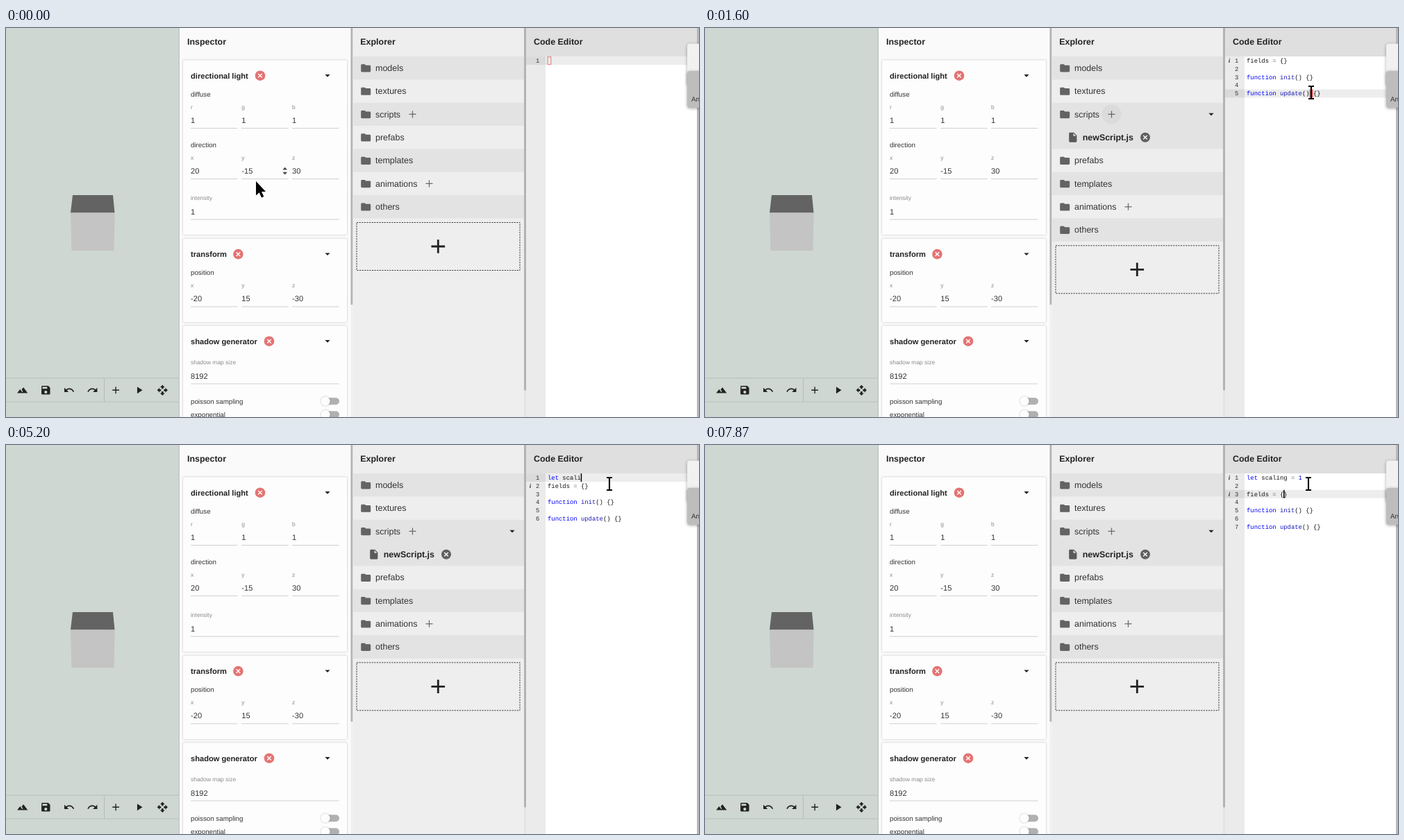
Animation, 998 px wide and 561 px high, one loop 8 s. Source, as an HTML page:

```html
<!DOCTYPE html>
<html lang="en">
<head>
<meta charset="utf-8">
<title>Scene editor</title>
<style>
  html, body { margin: 0; width: 100%; height: 100%; overflow: hidden; background: #ced7d1; }
  svg { display: block; width: 998px; height: 561px; font-family: "Liberation Sans", Arial, sans-serif; text-rendering: geometricPrecision; }
  .bold { font-weight: bold; }
  .code { font: 8.887px "Liberation Mono", monospace; white-space: pre; }
  .kw { fill: #0000ff; } .fn { fill: #1a1ab8; } .num { fill: #0000cd; } .op { fill: #687687; }
  .card { fill: #fdfdfd; filter: drop-shadow(0 .8px 1.2px rgba(0, 0, 0, .28)); }
  .float { filter: drop-shadow(0 1px 2px rgba(0, 0, 0, .35)); }
</style>
</head>
<body>
<svg viewBox="0 0 998 561">
  <g id="base"></g><g id="explorer"></g><g id="editor"></g><g id="overlay"></g><g id="mouse"></g>
</svg>
<script>
const LOOP = 8000, CHAR = 5.333, LINE = 11.85, TOP = 41.1, CODE_X = 780, ROW = 33.35;

// 24-unit icons
const ICON = {
  terrain: 'M14 6l-3.75 5 2.85 3.8-1.6 1.2C9.81 13.75 7 10 7 10l-6 8h22L14 6z',
  save: 'M17 3H5c-1.11 0-2 .9-2 2v14c0 1.1.89 2 2 2h14c1.1 0 2-.9 2-2V7l-4-4zm-5 16c-1.66 0-3-1.34-3-3s1.34-3 3-3 3 1.34 3 3-1.34 3-3 3zm3-10H5V5h10v4z',
  undo: 'M12.5 8c-2.65 0-5.05.99-6.9 2.6L2 7v9h9l-3.62-3.62c1.39-1.16 3.16-1.88 5.12-1.88 3.54 0 6.55 2.31 7.6 5.5l2.37-.78C21.08 11.03 17.15 8 12.5 8z',
  redo: 'M18.4 10.6C16.55 8.99 14.15 8 11.5 8c-4.65 0-8.58 3.03-9.96 7.22L3.9 16c1.05-3.19 4.05-5.5 7.6-5.5 1.95 0 3.73.72 5.12 1.88L13 16h9V7l-3.6 3.6z',
  add: 'M19 13h-6v6h-2v-6H5v-2h6V5h2v6h6v2z',
  play: 'M8 5v14l11-7z',
  move: 'M10 9h4V6h3l-5-5-5 5h3v3zm-1 1H6V7l-5 5 5 5v-3h3v-4zm14 2l-5-5v3h-3v4h3v3l5-5zm-9 3h-4v3H7l5 5 5-5h-3v-3z',
  folder: 'M10 4H4c-1.1 0-1.99.9-1.99 2L2 18c0 1.1.9 2 2 2h16c1.1 0 2-.9 2-2V8c0-1.1-.9-2-2-2h-8l-2-2z',
  file: 'M6 2c-1.1 0-1.99.9-1.99 2L4 20c0 1.1.89 2 1.99 2H18c1.1 0 2-.9 2-2V8l-6-6H6zm7 7V3.5L18.5 9H13z',
  drop: 'M7 10l5 5 5-5z'
};

const POINTER = {
  arrow: '<path d="M0 0V20.5L4.7 16.2 8 23.6 11.3 22.2 8 15H14Z"/>',
  hand: '<path d="M-2.3 2Q-2 0 0 0T2.3 2V6.2L4.5 6.4 9 8Q11 9 11 11V16Q11 18 9.3 19.5V23H-1V20.3L-6 14Q-7 11-4.5 11L-2.3 12.3Z"/>',
  text: '<path d="M-4-9h2.5Q0-9 0-7.5V7.5Q0 9-1.5 9H-4M4-9H1.5Q0-9 0-7.5V7.5Q0 9 1.5 9H4" fill="none" stroke="#000" stroke-width="2.1"/>'
};

const rect = (x, y, w, h, fill, more = '') => `<rect x="${x}" y="${y}" width="${w}" height="${h}" fill="${fill}" ${more}/>`;
const text = (x, y, s, size, fill = '#333', more = '') => `<text x="${x}" y="${y}" font-size="${size}" fill="${fill}" ${more}>${s}</text>`;
const bold = (x, y, s, size) => text(x, y, s, size, '#222', 'class="bold"');
const icon = (name, x, y, k = .7, fill = '#222') =>
  `<path d="${ICON[name]}" fill="${fill}" transform="translate(${x} ${y}) scale(${k}) translate(-12 -12)"/>`;
const thinPlus = (x, y) => `<path d="M${x - 5} ${y}h10m-5-5v10" stroke="#6a6a6a" stroke-width="1.25"/>`;
const close = (x, y, r, fill) => `<circle cx="${x}" cy="${y}" r="${r}" fill="${fill}"/>
  <path d="M${x - 2.8} ${y - 2.8}l5.6 5.6m0-5.6l-5.6 5.6" stroke="#fff" stroke-width="1.4"/>`;

function field(x, y, label, value, width = 67.5) {
  return text(x, y, label, 8.44, '#8a8a8a') + text(x, y + 20.5, value, 11.11) + rect(x, y + 27.6, width, 1, '#cfcfcf');
}
function vector(y, title, labels, values) {
  return text(266, y, title, 9.78) + values.map((v, i) => field([266, 339.3, 412][i], y + 17.5, labels[i], v)).join('');
}
function card(y, h, title, closeX) {
  return rect(255, y, 236, h, '#fdfdfd', 'rx="2" class="card"') + bold(266, y + 26.3, title, 11.14) +
    close(closeX, y + 22.4, 7.3, '#e57373') + icon('drop', 463, y + 22.2, .72);
}
function toggle(y, label) {
  return text(266, y + 3.8, label, 9.78) + rect(456, y - 5, 24, 10, '#b0b0b0', 'rx="5"') +
    `<circle cx="460" cy="${y}" r="6.6" fill="#fafafa" class="card"/>`;
}

function drawBase() {
  const tools = ['terrain', 'save', 'undo', 'redo', 'add', 'play', 'move'];
  return rect(0, 0, 250, 561, '#ced7d1') +
    '<path d="M96 241H154L156.5 266.5H93Z" fill="#636363"/><path d="M93 266.5H156.5L155.5 321.3H94.5Z" fill="#c4c4c4"/>' +
    rect(0, 504.5, 249, 1.2, '#b9c2bc') + rect(0, 538.5, 249, 1.2, '#bcc5bf') + rect(141, 506, 1, 33, '#b4bcb7') +
    tools.map((n, i) => icon(n, 23.7 + i * 33.6, 522.3, .69)).join('') +
    rect(248.6, 0, 1.4, 561, '#bfc6c1') + rect(250, 0, 250, 561, '#fafafa') + bold(261, 24.2, 'Inspector', 12.44) +
    card(46.3, 252, 'directional light', 366) +
    vector(99, 'diffuse', 'rgb', [1, 1, 1]) + vector(172, 'direction', 'xyz', [20, -15, 30]) +
    field(266, 248, 'intensity', 1, 213.5) +
    card(303.7, 120.5, 'transform', 334.4) + vector(356.3, 'position', 'xyz', [-20, 15, -30]) +
    card(429.3, 150, 'shadow generator', 379) + field(266, 485, 'shadow map size', 8192, 213.5) +
    toggle(538.2, 'poisson sampling') + toggle(557.5, 'exponential') +
    rect(496.5, 0, 3, 561, '#f0f0f0') + rect(496.5, 0, 3, 399, '#b3b3b3');
}

function drawExplorer(t) {
  const open = t >= 1070;
  const names = ['models', 'textures', 'scripts', 'prefabs', 'templates', 'animations', 'others'];
  let s = rect(499.5, 0, 247, 561, '#eee') + bold(510.3, 24.2, 'Explorer', 12.44);
  names.forEach((name, i) => {
    const y = 41 + ROW * (i + (open && i > 2)), mid = y + 16.7;
    if (i % 2 === 0) s += rect(499.5, y, 246.5, ROW, '#e3e3e3');
    s += icon('folder', 518.2, mid + .2, .7, '#636363') + text(532, mid + 4.3, name, 12.5);
    if (name === 'scripts') s += thinPlus(585.5, mid);
    if (name === 'animations') s += thinPlus(609.5, mid);
  });
  if (open) {
    const y = 41 + ROW * 3, mid = y + 16.7;
    s += rect(499.5, y, 246.5, ROW, '#e3e3e3') + icon('file', 529.8, mid, .7, '#5a5a5a') +
      bold(543.7, mid + 4.3, 'newScript.js', 12.44) + close(634, mid, 7, '#606060') + icon('drop', 729, 124.3, .72);
  }
  const hover = Math.max(0, Math.min((t - 1000) / 130, (1800 - t) / 300, 1));
  if (hover > 0) s += `<circle cx="585.5" cy="124.4" r="14" opacity="${hover * .045}"/>`;
  const boxY = open ? 313.8 : 280.5;
  s += rect(505, boxY, 235, 69, 'none', 'stroke="#333" stroke-dasharray="2.2 1.4" stroke-width=".95"') +
    icon('add', 622.3, boxY + 34.5, 1.4);
  return s + rect(746, 0, 3, 561, '#e4e4e4') + rect(746, 0, 3, 522.5, '#b3b3b3');
}

const FILE = ['fields = {}', '', 'function init() {}', '', 'function update() {}'];
const TYPED = 'let scaling = 1';
const KEYS = [3930, 4000, 4130, 4200, 4470, 4730, 4800, 4870, 5200, 5330, 5470, 5530, 5670, 5800, 5870];

// time, row, column, caret shape
const CARET = [
  [0, 0, 0, 'frame'], [1530, 4, 17, 'block'], [2270, 1, 0, 'block'], [3000, 1, 0, ''], [3330, 0, 0, 'block'],
  [3600, 0, 0, 'bar'], [6130, 1, 0, 'bar'], [6400, 1, 0, 'block'], [6670, 2, 0, 'block'], [6930, 2, 5, 'block'],
  [7200, 2, 7, 'block'], [7470, 2, 10, 'block'], [7870, 2, 10, 'bar']
];
// time, rows with an info mark, row with a warning
const MARKS = [[0, [], -1], [1530, [0], -1], [3600, [], -1], [4200, [1], -1], [5670, [], 1], [6130, [], 2], [6400, [0, 2], -1]];
const latest = (list, t) => list.filter(e => e[0] <= t).pop();

const paint = line => line.replace(/(function|let)|(init|update)|(\d)|(=)/g, (m, ...g) =>
  `<tspan class="${['kw', 'fn', 'num', 'op'][g.findIndex(Boolean)]}">${m}</tspan>`);

function drawEditor(t) {
  const count = KEYS.filter(k => k <= t).length;
  let lines = t < 1070 ? [''] : FILE;
  if (t >= 3600) lines = [TYPED.slice(0, count), ...(t >= 6130 ? [''] : []), ...FILE];
  let [, row, col, shape] = latest(CARET, t);
  if (t >= 3600 && t < 6130) col = count;
  const [, infos, warning] = latest(MARKS, t);
  const rowY = i => TOP + i * LINE, y = rowY(row), x = CODE_X + col * CHAR;

  let s = rect(749, 0, 249, 561, '#fff') + rect(749, 0, 247, 41, '#dfdfdf') + bold(760, 24.2, 'Code Editor', 12.44) +
    rect(749, 41, 28, 520, '#ebebeb') + rect(749, y, 28, LINE, '#dadada') + rect(777, y, 218, LINE, '#ededed');
  if (shape === 'block') s += rect(x - .4, y, CHAR + .3, LINE, '#e67878');
  if (shape === 'frame') s += rect(x, y + .6, CHAR - .5, LINE - 1, 'none', 'stroke="#e67878"');
  lines.forEach((line, i) => {
    const base = rowY(i) + 8.8;
    s += text(768.4, base, i + 1, 8.887, '#333', 'text-anchor="end" class="code"') +
      text(CODE_X, base, paint(line), 8.887, '#111', 'class="code"');
  });
  for (const i of infos)
    s += text(753.8, rowY(i) + 8.8, 'i', 9, '#333', 'font-family="Liberation Serif, serif" font-style="italic" font-weight="bold"');
  if (warning >= 0) {
    const w = rowY(warning) + 2;
    s += `<path d="M755 ${w}L759.3 ${w + 7.5}H750.7Z" fill="#f3c27c" stroke="#9a6a35" stroke-width=".9" stroke-linejoin="round"/>
      <path d="M755 ${w + 2.6}v2.4m0 .7v1" stroke="#4a3010" stroke-width="1"/>`;
  }
  if (shape === 'bar') s += rect(x - .3, y, 1.5, LINE, '#000');
  return s;
}

const drawOverlay = () => rect(995, 0, 3, 561, '#b9b9b9') +
  rect(981, 22.5, 30, 60, '#f1f1f1', 'rx="4" class="float"') +
  rect(981, 62, 30, 53, '#bdbdbd', 'rx="4" class="float"') + text(987, 105.6, 'An', 9.8);

const PATH = [
  [0, 360, 221], [70, 360, 221], [200, 376, 243], [330, 430, 249], [470, 535, 178], [600, 588, 116], [1070, 588, 116],
  [1200, 625, 112], [1400, 765, 97], [1600, 873, 93], [1870, 873, 93], [2130, 845, 64], [2270, 833, 56],
  [2400, 833, 56], [2670, 869, 56], [LOOP, 869, 56]
];

function drawMouse(t) {
  const n = PATH.findIndex(p => p[0] > t), [t0, x0, y0] = PATH[n - 1], [t1, x1, y1] = PATH[n];
  const k = (t - t0) / (t1 - t0), x = x0 + (x1 - x0) * k, y = y0 + (y1 - y0) * k;
  const kind = x < 500 ? 'arrow' : x < 746 ? 'hand' : x < 777 ? 'arrow' : 'text';
  const spinner = t < 200 ? '<path d="M398.4 204.6l3.3-3.8 3.3 3.8zm0 3.2l3.3 3.8 3.3-3.8z" fill="#444"/>' : '';
  return `${spinner}<g transform="translate(${x} ${y})">${POINTER[kind]}</g>`;
}

const shown = {};
function show(id, markup) {
  if (shown[id] !== markup) document.getElementById(id).innerHTML = shown[id] = markup;
}
function frame() {
  const t = performance.now() % LOOP;
  show('explorer', drawExplorer(t));
  show('editor', drawEditor(t));
  show('mouse', drawMouse(t));
  requestAnimationFrame(frame);
}
show('base', drawBase());
show('overlay', drawOverlay());
frame();
</script>
</body>
</html>
```
